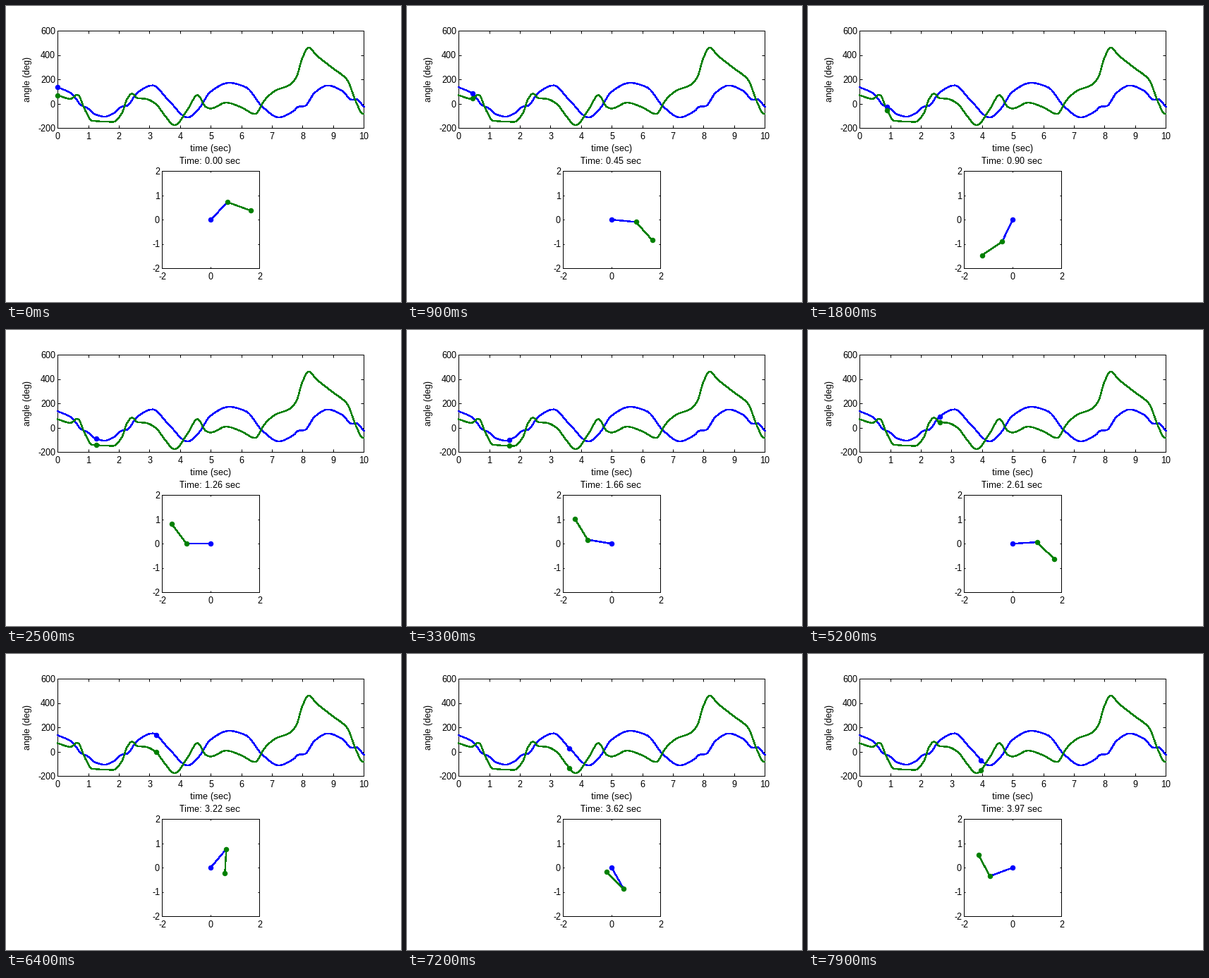
A matplotlib script that plays this animation: 560 px wide and 420 px high, repeating every 8000 ms.

```python
import numpy as np
import matplotlib.pyplot as plt
from matplotlib.animation import FuncAnimation

plt.rcParams.update({"font.family": "Liberation Sans", "font.size": 9.36,
                     "text.hinting": "native", "text.hinting_factor": 1})

W, H, DPI = 560, 420, 100
PX = 72 / DPI                     # points per pixel
BLUE, GREEN = (0, 0, 1), (0, 0.5, 0)
FRAMES, STEP = 80, 100

# Turning points and knees of the two arm angles: (seconds, degrees)
UPPER = [
    (0, 136), (.45, 85), (.8, -18), (.93, -28), (1.22, -87), (1.54, -106),
    (1.81, -81), (2.11, -22), (2.26, -17), (2.61, 93), (3.1, 151),
    (3.62, 29), (4.25, -113), (4.6, -45), (5, 100), (5.6, 172), (6.15, 136),
    (6.7, -27), (7.22, -112), (7.7, -62), (7.88, -23), (8.06, -20),
    (8.4, 92), (8.82, 150), (9.3, 106), (9.6, 33), (9.75, 39), (10, -24)]
LOWER = [
    (0, 70), (.42, 40), (.65, 75), (.9, -54), (1.12, -140), (1.82, -149),
    (2.11, -73), (2.26, 36), (2.43, 84), (2.61, 46), (2.88, 40), (3.22, -4),
    (3.5, -97), (3.82, -177), (4.25, -46), (4.57, 72), (4.85, -28),
    (5, -39), (5.5, 9), (6, -29), (6.45, -84), (6.76, 30), (7.1, 106),
    (7.6, 158), (7.8, 220), (8, 380), (8.2, 463), (8.45, 400), (9, 290),
    (9.45, 199), (9.76, 8), (9.97, -84), (10, -84)]


def ease_through(keys, t):
    """Monotone cubic through the keys: level at every turning point."""
    x, y = np.array(keys, float).T
    h, d = np.diff(x), np.diff(y) / np.diff(x)
    a, b = d[:-1], d[1:]
    same = a * b > 0
    inner = np.where(same, 2 * a * b / np.where(same, a + b, 1), 0)
    m = np.r_[d[0], inner, d[-1]]
    i = np.clip(np.searchsorted(x, t, side="right") - 1, 0, len(h) - 1)
    s = (t - x[i]) / h[i]
    blend = s * s * (3 - 2 * s)
    bend = s * (1 - s) * ((1 - s) * m[i] - s * m[i + 1])
    return y[i] + (y[i + 1] - y[i]) * blend + h[i] * bend


t = np.linspace(0, 10, 200)
angles = [ease_through(keys, t) for keys in (UPPER, LOWER)]

fig = plt.figure(figsize=(W / DPI, H / DPI), dpi=DPI, facecolor="white")


def label(x, y, s, ha="center", **kw):
    return fig.text(x / W, 1 - y / H, s, ha=ha, va="baseline", **kw)


def make_axes(left, top, right, bottom, xticks, yticks, tick):
    xlim, ylim = (xticks[0], xticks[-1]), (yticks[0], yticks[-1])
    # The small offset keeps the frame on whole pixels after snapping
    ax = fig.add_axes([(left + .2) / W, 1 - (bottom + .2) / H,
                       (right - left) / W, (bottom - top) / H])
    ax.set(xlim=xlim, ylim=ylim, xticks=xticks, yticks=yticks)
    ax.tick_params(direction="in", length=tick * PX, width=PX, top=True,
                   right=True, labelbottom=False, labelleft=False)
    for spine in ax.spines.values():
        spine.set_linewidth(PX)
    for v in xticks:
        label(np.interp(v, xlim, (left, right)) + .5, bottom + 16, str(v))
    for v in yticks:
        label(left - 3, np.interp(v, ylim, (bottom, top)) + 5, str(v), "right")
    return ax


def line(ax, color, x=(), y=(), **kw):
    return ax.plot(x, y, color=color, lw=1.4 * PX, ms=7.5 * PX, mew=0,
                   antialiased=False, clip_on=False, zorder=3, **kw)[0]


plot = make_axes(73, 35, 507, 173, range(11), range(-200, 601, 200), 4)
arm = make_axes(221, 234, 359, 372, range(-2, 3, 2), range(-2, 3), 2)
label(290, 206, "time (sec)")
label(34, 104, "angle (deg)", rotation=90, rotation_mode="anchor")
title = label(289, 224, "")

for color, angle in zip((BLUE, GREEN), angles):
    line(plot, color, t, angle)
dots = [line(plot, c, marker="o") for c in (BLUE, GREEN)]
rods = [line(arm, BLUE, marker="o", markevery=[0]),
        line(arm, GREEN, marker="o")]


def update(k):
    now = np.array([angle[k] for angle in angles])
    for dot, a in zip(dots, now):
        dot.set_data([t[k]], [a])
    a = np.radians(now)
    x = np.cumsum(np.r_[0, np.sin(a)])
    y = np.cumsum(np.r_[0, -np.cos(a)])
    for i, rod in enumerate(rods):
        rod.set_data(x[i:i + 2], y[i:i + 2])
    title.set_text(f"Time: {t[k]:.2f} sec")
    return [*dots, *rods, title]


anim = FuncAnimation(fig, update, frames=FRAMES, interval=STEP,
                     repeat=True, repeat_delay=0, blit=False)
plt.show()
```
